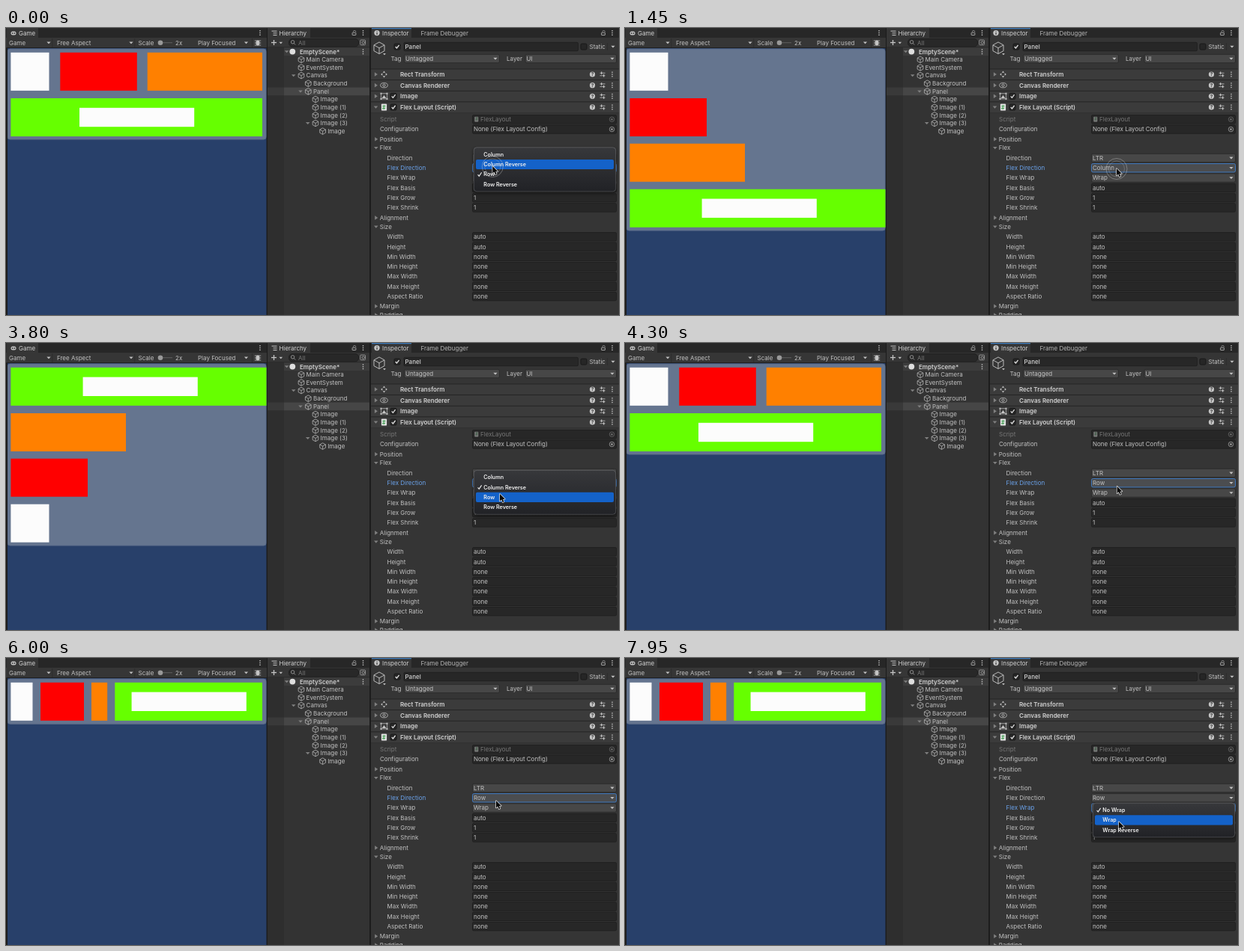
An HTML page with a canvas that plays this animation: 818x384 px, repeating every 8 s.

```html
<!DOCTYPE html>
<html lang="en">
<head>
<meta charset="utf-8">
<title>Flex layout inspector</title>
<style>
html, body { margin: 0; width: 100%; height: 100%; overflow: hidden; background: #1b1b1b; }
canvas { display: block; width: 818px; height: 384px; }
</style>
</head>
<body>
<canvas id="stage" width="818" height="384"></canvas>
<script>
const LOOP = 8000;
const ctx = document.getElementById('stage').getContext('2d');
const FONT = 'Inter, "Open Sans", sans-serif';
const TEXT = '#c2c2c2', DIM = '#777777', BLUE = '#6ba3ec', ICON = '#c4c4c4';

// ---------- timeline ----------
const DIRS = ['Column', 'Column Reverse', 'Row', 'Row Reverse'];
const WRAPS = ['No Wrap', 'Wrap', 'Wrap Reverse'];

const menus = [
  { open: -100, pick: 780, close: 900, items: DIRS, on: 2, y: 187 },
  { open: 1550, pick: 2200, close: 2320, items: DIRS, on: 0, y: 187 },
  { open: 3050, pick: 3860, close: 3990, items: DIRS, on: 1, y: 187 },
  { open: 4920, pick: 5730, close: 5880, items: WRAPS, on: 1, y: 200.3 },
  { open: 7150, pick: 7840, close: 9000, items: WRAPS, on: 0, y: 200.3 }
];
const clicks = [-50, 1420, 3000, 7100];
const layouts = [[0, 'row'], [1000, 'column'], [2400, 'reverse'], [4100, 'row'], [6000, 'single']];
const dirLabels = [[0, 'Row'], [1050, 'Column'], [2500, 'Column Reverse'], [4150, 'Row']];
const wrapLabels = [[0, 'Wrap'], [6050, 'No Wrap']];
const focusRows = [[0, 'Flex Direction'], [6050, 'Flex Wrap']];

// time, x, y of the pointer tip
const path = [
  [50, 649.3, 185], [400, 652, 167], [920, 653, 168], [1400, 656, 188], [1700, 656, 188],
  [2050, 654, 202], [2660, 654, 202], [2950, 656, 188], [3560, 656, 188], [3800, 659, 202],
  [4060, 659, 202], [4400, 656, 189], [4800, 653, 200], [5160, 653, 200], [5300, 652.5, 217],
  [5410, 652.5, 217], [5600, 654, 191], [6050, 654, 191], [6500, 656, 200], [6620, 656, 200],
  [6800, 657, 199], [7350, 657, 199], [7700, 659, 219]
];

const clamp = v => Math.max(0, Math.min(1, v));
const ease = v => v * v * (3 - 2 * v);

function stateAt(list, t) {
  let value = list[0][1];
  for (const [at, v] of list) if (t >= at) value = v;
  return value;
}

function pointerAt(t) {
  if (t <= path[0][0]) return path[0].slice(1);
  for (let i = 1; i < path.length; i++) {
    const [t0, x0, y0] = path[i - 1], [t1, x1, y1] = path[i];
    if (t <= t1) {
      const k = ease((t - t0) / (t1 - t0));
      return [x0 + (x1 - x0) * k, y0 + (y1 - y0) * k];
    }
  }
  return path[path.length - 1].slice(1);
}

// ---------- drawing helpers ----------
function rect(x, y, x2, y2, color) {
  ctx.fillStyle = color;
  ctx.fillRect(x, y, x2 - x, y2 - y);
}

function box(x, y, x2, y2, r, fill, stroke) {
  ctx.beginPath();
  ctx.roundRect(x, y, x2 - x, y2 - y, r);
  if (fill) { ctx.fillStyle = fill; ctx.fill(); }
  if (stroke) { ctx.strokeStyle = stroke; ctx.lineWidth = 1; ctx.stroke(); }
}

// cy is the middle of the capitals
function text(str, x, cy, color = TEXT, weight = 400, size = 8) {
  ctx.font = `${weight} ${size}px ${FONT}`;
  ctx.fillStyle = color;
  ctx.fillText(str, x, cy + size * 0.364);
}

function line(points, color = ICON, width = 0.9, close = false) {
  ctx.beginPath();
  points.forEach(([x, y], i) => i ? ctx.lineTo(x, y) : ctx.moveTo(x, y));
  if (close) ctx.closePath();
  ctx.strokeStyle = color;
  ctx.lineWidth = width;
  ctx.stroke();
}

function shape(points, color) {
  ctx.beginPath();
  points.forEach(([x, y]) => ctx.lineTo(x, y));
  ctx.closePath();
  ctx.fillStyle = color;
  ctx.fill();
}

function dot(x, y, r, color) {
  ctx.beginPath();
  ctx.arc(x, y, r, 0, 7);
  ctx.fillStyle = color;
  ctx.fill();
}

function ring(x, y, r, color = ICON, width = 0.9) {
  ctx.beginPath();
  ctx.arc(x, y, r, 0, 7);
  ctx.strokeStyle = color;
  ctx.lineWidth = width;
  ctx.stroke();
}

const down = (x, y, s = 2.6, color = ICON) =>
  shape([[x - s, y - s / 2], [x + s, y - s / 2], [x, y + s * 0.6]], color);
const right = (x, y, color = '#808080') =>
  shape([[x - 1.6, y - 2.8], [x + 2.4, y], [x - 1.6, y + 2.8]], color);
const fold = (x, y, open) => open ? down(x, y, 2.8, '#808080') : right(x, y);

function kebab(x, y) {
  for (let i = -1; i < 2; i++) rect(x - 0.7, y + i * 2.8 - 0.7, x + 0.7, y + i * 2.8 + 0.7, ICON);
}

function lock(x, y) {
  box(x - 2.4, y - 0.2, x + 2.4, y + 3, 0.3, null, '#a0a0a0');
  ctx.beginPath();
  ctx.arc(x + 0.6, y - 1.2, 1.8, Math.PI, 0);
  ctx.strokeStyle = '#a0a0a0';
  ctx.lineWidth = 0.8;
  ctx.stroke();
}

function cube(x, y, r, color = '#b4b4b4', width = 0.8) {
  const w = r * 0.9, h = r * 0.5;
  line([[x, y - r], [x + w, y - h], [x + w, y + h], [x, y + r], [x - w, y + h], [x - w, y - h]], color, width, true);
  line([[x - w, y - h], [x, y], [x + w, y - h]], color, width);
  line([[x, y], [x, y + r]], color, width);
}

function check(x, y, on) {
  box(x - 4, y - 4, x + 4, y + 4, 1.5, '#262626', '#191919');
  if (on) line([[x - 2.3, y], [x - 0.6, y + 2], [x + 2.6, y - 2.2]], '#e0e0e0', 1.3);
}

function field(x, y, x2, str, color = TEXT, weight = 400) {
  box(x + 0.5, y - 5.7, x2 - 0.5, y + 5.7, 1.5, '#272727', '#202020');
  text(str, x + 2, y, color, weight);
}

function dropdown(x, y, x2, str, focus = false) {
  box(x + 0.5, y - 5.7, x2 - 0.5, y + 5.7, 2, focus ? '#4b4d50' : '#474747', focus ? '#3f78bd' : '#2b2b2b');
  text(str, x + 2, y);
  down(x2 - 6, y);
}

// ---------- game panel ----------
const WHITE = '#fcfcfc', RED = '#ff0000', ORANGE = '#ff8000', LIME = '#66ff00';
const ROWS = [32.8, 94, 154.7, 215.7];

function tile(x, x2, row, color) {
  rect(x, ROWS[row], x2, ROWS[row] + 51, color);
}

function inner(x, row) {
  rect(x, ROWS[row] + 12.8, x + 153.2, ROWS[row] + 38.2, WHITE);
}

function drawGame(mode) {
  ctx.save();
  ctx.beginPath();
  ctx.rect(2, 27, 345.5, 357);
  ctx.clip();
  rect(2, 27, 348, 384, '#28406a');
  ctx.filter = 'blur(0.5px)'; // soft edges of the scaled-up view
  const bottom = { row: 149, single: 88.3, column: 271, reverse: 271 }[mode];
  box(2, 28, 347.3, bottom, 3.5, '#65758f', '#5a6b88');
  if (mode === 'row') {
    tile(6.4, 57.5, 0, WHITE);
    tile(72.3, 174.8, 0, RED);
    tile(188.7, 342, 0, ORANGE);
    tile(6.4, 342, 1, LIME);
    inner(98, 1);
  } else if (mode === 'single') {
    tile(6.4, 35.5, 0, WHITE);
    tile(46, 104, 0, RED);
    tile(114, 135.2, 0, ORANGE);
    tile(145.3, 342, 0, LIME);
    inner(167.6, 0);
  } else {
    const row = i => mode === 'column' ? i : 3 - i;
    tile(6.4, 57.5, row(0), WHITE);
    tile(6.4, 109, row(1), RED);
    tile(6.4, 160, row(2), ORANGE);
    tile(6.4, 350, row(3), LIME);
    inner(102.6, row(3));
  }
  ctx.restore();
}

function drawGameBar() {
  rect(0, 0, 348, 13, '#272727');
  rect(1, 0, 43, 13, '#363636');
  box(6.5, 4.5, 13.5, 9.5, 2.5, ICON);
  dot(8.7, 7, 0.9, '#363636');
  dot(11.4, 7, 0.9, '#363636');
  text('Game', 17, 6.7, '#d2d2d2');
  kebab(339, 6.5);
  rect(0, 13, 348, 26, '#363636');
  rect(0, 26, 348, 27, '#1f1f1f');
  text('Game', 4, 19.7);
  down(57, 19.7);
  text('Free Aspect', 68, 19.7);
  down(167, 19.7);
  text('Scale', 176.5, 19.7);
  rect(203, 19.2, 222, 20.2, '#5e5e5e');
  dot(206, 19.7, 3.3, '#999999');
  text('2x', 226, 19.7);
  text('Play Focused', 256, 19.7);
  down(320.5, 19.7);
  for (const x of [61.5, 171.5, 328]) rect(x, 14, x + 0.7, 26, '#282828');
  box(333.6, 16.5, 338.4, 23.5, 2.4, ICON);
  for (const y of [17, 20, 23]) rect(331.8, y - 0.4, 340.2, y + 0.4, ICON);
}

// ---------- hierarchy ----------
const tree = [
  ['Main Camera', 394, 0], ['EventSystem', 394, 0], ['Canvas', 394, 1], ['Background', 403.3, 0],
  ['Panel', 403.3, 1], ['Image', 413, 0], ['Image (1)', 413, 0], ['Image (2)', 413, 0],
  ['Image (3)', 413, 1], ['Image', 422.6, 0]
];

function drawHierarchy() {
  rect(349, 0, 485, 384, '#333333');
  rect(349, 0, 485, 13, '#272727');
  rect(349, 0, 406, 13, '#363636');
  for (let i = 0; i < 3; i++) rect(354.5 + (i ? 2 : 0), 3.6 + i * 2.7, 361.5, 4.6 + i * 2.7, ICON);
  text('Hierarchy', 364.5, 6.7, '#d2d2d2');
  lock(464.5, 6.5);
  kebab(476.5, 6.5);
  rect(349, 13, 485, 26, '#363636');
  rect(349, 25.5, 485, 26.3, '#222222');
  line([[354, 19.5], [361, 19.5]], ICON, 1.3);
  line([[357.5, 16], [357.5, 23]], ICON, 1.3);
  down(366.8, 19.8, 2.3);
  box(377.5, 14.5, 470.5, 24.8, 4.5, '#282828', '#202020');
  ring(382.6, 18.8, 2.2, '#9a9a9a');
  line([[384.2, 20.4], [386.2, 22.4]], '#9a9a9a');
  text('All', 390, 19.8, DIM);
  box(472.8, 16, 479.5, 22.7, 1, null, '#8e8e8e');
  ring(476.8, 19.5, 1.7, '#a5a5a5', 0.8);

  rect(349, 26.3, 371, 384, '#2e2e2e');
  rect(371, 26.3, 485, 37, '#3c3c3c');
  fold(374.6, 31.6, true);
  dot(382.3, 31.6, 3.9, '#dedede');
  text('EmptyScene*', 392, 31.8, '#d0d0d0', 600);
  kebab(476.5, 31.7);
  tree.forEach(([name, x, open], i) => {
    const y = 42.3 + i * 10.64;
    if (name === 'Panel') {
      rect(349, y - 5.3, 371, y + 5.3, '#393939');
      rect(371, y - 5.3, 485, y + 5.3, '#464646');
    }
    if (open) fold(x - 10.3, y, true);
    cube(x, y, 4.3);
    text(name, x + 6.6, y);
  });
}

// ---------- inspector ----------
const sizes = ['Width', 'Height', 'Min Width', 'Min Height', 'Max Width', 'Max Height', 'Aspect Ratio'];

function header(name, i, icon, checked) {
  const y = 62 + i * 14.65;
  rect(487, y - 7.3, 818, y + 7.3, '#3b3b3b');
  rect(487, y - 7.5, 818, y - 6.7, '#202020');
  fold(493.5, y, i === 3);
  icon(504.5, y);
  if (checked) check(517, y, true);
  text(name, 526, y, '#d2d2d2', 600);
  dot(782.5, y, 3.6, ICON);
  text('?', 780.7, y, '#3b3b3b', 700, 6.5);
  for (const s of [-1, 1]) {
    rect(792.5, y + s * 1.8 - 0.4, 799.5, y + s * 1.8 + 0.4, ICON);
    rect(795.5 + s * 1.5, y + s * 1.8 - 1.7, 796.8 + s * 1.5, y + s * 1.8 + 1.7, ICON);
  }
  kebab(809, y);
}

function moveIcon(x, y) {
  for (const [a, b] of [[1, 0], [-1, 0], [0, 1], [0, -1]])
    shape([[x + a * 4.4, y + b * 4.4], [x + a * 2.2 + b * 1.7, y + b * 2.2 + a * 1.7],
           [x + a * 2.2 - b * 1.7, y + b * 2.2 - a * 1.7]], ICON);
}

function eyeIcon(x, y) {
  ctx.beginPath();
  ctx.ellipse(x, y, 4.8, 3.2, 0, 0, 7);
  ctx.strokeStyle = ICON;
  ctx.lineWidth = 0.8;
  ctx.stroke();
  ring(x, y, 1.6, ICON, 0.9);
}

function imageIcon(x, y) {
  box(x - 4, y - 3.6, x + 4, y + 3.6, 0, null, '#9a9a9a');
  shape([[x - 3, y + 2.6], [x, y - 1.4], [x + 3, y + 2.6]], ICON);
  for (const a of [-4, 4]) for (const b of [-3.6, 3.6]) rect(x + a - 1, y + b - 1, x + a + 1, y + b + 1, ICON);
}

function scriptIcon(x, y) {
  box(x - 3.6, y - 4.5, x + 3.6, y + 4.5, 0.8, '#e4e4e4');
  text('#', x - 2.4, y + 0.2, '#3c9a4c', 700, 7);
}

function target(x, y, color) {
  ring(x, y, 3.2, color, 0.8);
  dot(x, y, 1.3, color);
}

function drawInspector(dir, wrap, focus) {
  rect(487, 0, 818, 384, '#353535');
  rect(487, 0, 818, 13, '#272727');
  rect(488, 0, 541, 13, '#363636');
  rect(488, 0, 541, 1.2, '#3a79bb');
  dot(495, 6.6, 3.7, ICON);
  rect(494.5, 6, 495.6, 9, '#333333');
  rect(494.5, 4.2, 495.6, 5.2, '#333333');
  text('Inspector', 502, 6.7, '#d2d2d2');
  text('Frame Debugger', 553.5, 6.7, '#b5b5b5');
  lock(797, 6.5);
  kebab(809, 6.5);

  cube(498, 26.7, 7.8, '#bcbcbc', 1);
  down(505, 35, 1.9);
  check(522, 25, true);
  field(530.5, 25, 764, 'Panel', '#d6d6d6', 500);
  check(771, 25, false);
  text('Static', 778.5, 25);
  rect(802, 20, 802.7, 30, '#2a2a2a');
  down(810, 25);
  text('Tag', 513.5, 41);
  dropdown(531, 41, 659, 'Untagged');
  text('Layer', 668, 41);
  dropdown(692.5, 41, 815, 'UI');

  header('Rect Transform', 0, moveIcon);
  header('Canvas Renderer', 1, eyeIcon);
  header('Image', 2, imageIcon, true);
  header('Flex Layout (Script)', 3, scriptIcon, true);
  rect(487, 113, 818, 113.7, '#303030');

  text('Script', 499, 122.2, DIM);
  field(622, 122.2, 815, '');
  box(625.3, 118.8, 630.3, 125.4, 0.6, '#7d7d7d');
  text('#', 626.2, 122.2, '#3f5a45', 700, 5.5);
  text('FlexLayout', 633, 122.2, DIM);
  target(808.5, 122.2, '#6a6a6a');
  text('Configuration', 499, 135.5);
  field(622, 135.5, 815, 'None (Flex Layout Config)');
  target(808.5, 135.5, '#a8a8a8');

  for (const [name, y, open] of [['Position', 148.7, 0], ['Flex', 160.5, 1], ['Alignment', 253.9, 0],
    ['Size', 266, 1], ['Margin', 372.3, 0], ['Padding', 384, 0]]) {
    fold(493.8, y, open);
    text(name, 498.8, y);
  }

  const flex = [['Direction', 'LTR', 1], ['Flex Direction', dir, 1], ['Flex Wrap', wrap, 1],
    ['Flex Basis', 'auto', 0], ['Flex Grow', '1', 0], ['Flex Shrink', '1', 0]];
  flex.forEach(([name, value, drop], i) => {
    const y = 173.9 + i * 13.3, active = name === focus;
    text(name, 508.5, y, active ? BLUE : TEXT);
    if (drop) dropdown(622, y, 815, value, active);
    else field(622, y, 815, value);
  });
  sizes.forEach((name, i) => {
    const y = 279.3 + i * 13.3;
    text(name, 508.5, y);
    field(622, y, 815, i < 2 ? 'auto' : 'none');
  });
}

// ---------- overlays ----------
function menuFill(top, bottom) {
  const fill = ctx.createLinearGradient(0, top, 0, bottom);
  fill.addColorStop(0, '#37383b');
  fill.addColorStop(1, '#212226');
  return fill;
}

function drawMenu(m, t, tipY) {
  const alpha = Math.min(clamp((t - m.open) / 100), 1 - clamp((t - m.close) / 120));
  if (alpha <= 0) return;
  const step = 13.3;
  const first = m.y + 3.2 - m.on * 10.5;
  const top = first - 9.7, bottom = first + (m.items.length - 1) * step + 10;
  ctx.save();
  ctx.globalAlpha = alpha;
  ctx.shadowColor = 'rgba(0,0,0,0.5)';
  ctx.shadowBlur = 5;
  ctx.shadowOffsetY = 2;
  box(624, top, 814, bottom, 4, menuFill(top, bottom));
  ctx.shadowColor = 'transparent';
  box(624.3, top + 0.3, 813.7, bottom - 0.3, 4, null, 'rgba(255,255,255,0.17)');
  const hover = Math.floor((tipY - first) / step + 0.5);
  const blink = t >= m.pick && t < m.pick + 85;
  m.items.forEach((name, i) => {
    const y = first + i * step;
    if (i === hover && !blink) box(627, y - 6.6, 811, y + 6.6, 2, '#1462c9');
    if (i === m.on) line([[629.6, y + 0.3], [631.3, y + 2.4], [634.6, y - 2.6]], '#f0f0f0', 1.1);
    text(name, 637.3, y, '#f0f0f0', 600, 7.2);
  });
  ctx.restore();
}

function drawClick(t, x, y) {
  for (const at of clicks) {
    const age = t - at;
    if (age < 0 || age > 380) continue;
    ctx.save();
    ctx.globalAlpha = 1 - clamp((age - 160) / 220);
    ring(x, y + 0.5, 14, 'rgba(210,210,210,0.42)');
    ring(x, y + 0.5, 10.5, 'rgba(210,210,210,0.28)');
    ctx.restore();
  }
}

function drawPointer(x, y) {
  ctx.save();
  ctx.translate(x, y);
  const arrow = [[0, 0], [0, 9.6], [2.2, 7.6], [3.8, 11.2], [5.4, 10.5], [4, 7], [6.8, 6.8]];
  ctx.lineJoin = 'round';
  line(arrow, '#e8e8e8', 1.4, true);
  shape(arrow, '#0a0a0a');
  ctx.restore();
}

function draw(t) {
  const [x, y] = pointerAt(t);
  rect(0, 0, 818, 384, '#1c1c1c');
  drawGameBar();
  drawGame(stateAt(layouts, t));
  drawHierarchy();
  drawInspector(stateAt(dirLabels, t), stateAt(wrapLabels, t), stateAt(focusRows, t));
  for (const m of menus) drawMenu(m, t, y);
  drawClick(t, x, y);
  drawPointer(x, y);
}

const start = performance.now();
function tick() {
  draw((performance.now() - start) % LOOP);
  requestAnimationFrame(tick);
}
tick();
</script>
</body>
</html>
```
